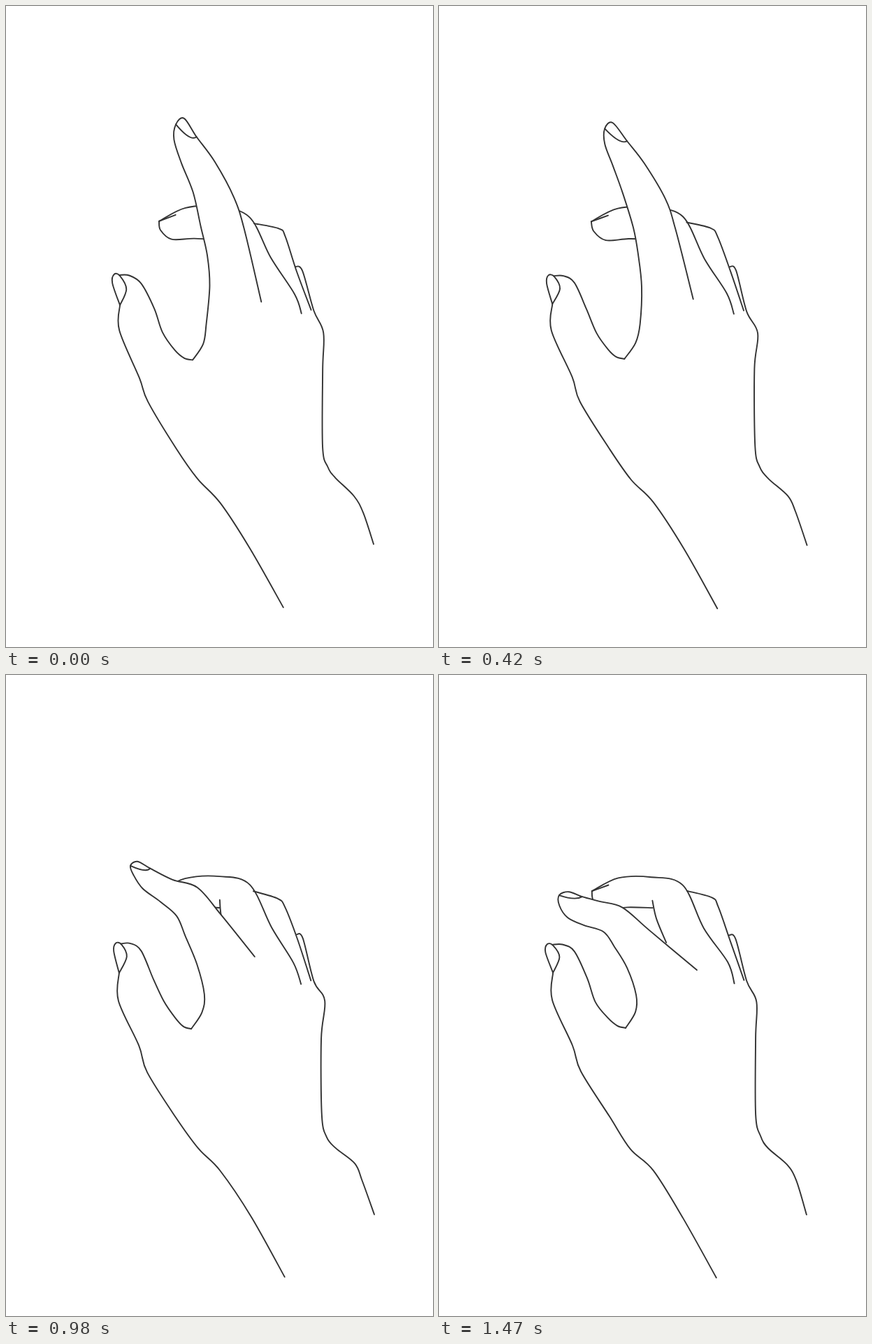
An HTML page with a canvas that plays this animation: 611 by 917 pixels, repeating every 1540 ms.

```html
<!DOCTYPE html>
<html lang="en">
<head>
<meta charset="utf-8">
<title>Tapping hand</title>
<style>
html, body { margin: 0; height: 100%; overflow: hidden; background: #fff; }
canvas { display: block; }
</style>
</head>
<body>
<canvas id="stage" width="611" height="917"></canvas>
<script>
const ctx = document.getElementById('stage').getContext('2d');
const STEP = 70, STEPS = 22, BOIL = 1.2;

const points = text => text.split(' ').map(pair => pair.split(',').map(Number));

// Parts that stay in place; the index finger covers some of them
const hand = {
  arm: '162,427 162,465 190,531 203,567 243,633 275,677 306,710 350,776 398,861',
  thumb: '163,385 177,385 193,396 212,434 225,467 241,491 254,503 266,506',
  thumbNail: '162,427 153,396 156,384 164,386 172,404 162,427',
  middle: '219,309 257,290 305,288 348,301 380,361 412,412 423,441',
  middleNail: '219,309 243,300',
  middlePad: '219,309 222,322 238,334 270,332 305,334',
  middleSide: '305,323 310,350 326,382',
  ring: '354,310 390,319 400,331 416,379 437,436',
  wrist: '415,372 424,378 441,437 455,467 452,520 452,630 460,660 472,676 498,700 510,724 527,771'
};

// Index finger: up its inner side, round the tip, down the outer side to the crease
const finger = {
  tapped: '266,506 280,483 282,458 270,418 250,390 235,368 208,357 185,346 172,330 171,316 185,311 205,317 232,323 263,332 300,366 368,423',
  half: '266,506 281,483 284,457 279,408 266,364 254,331 236,299 213,272 199,250 194,236 203,229 222,243 255,265 289,287 318,330 352,401',
  high: '266,506 281,482 288,452 298,399 296,355 291,312 280,258 268,208 261,172 267,146 281,137 300,168 318,207 345,275 350,320 374,437'
};

for (const group of [hand, finger])
  for (const name in group) group[name] = points(group[name]);

// [step, lift]: 0 is tapped down, 1 is raised fully
const taps = [[0, .87], [4, 0], [6, .84], [8, .87], [11, .5], [13, 0], [14, .27], [17, 1], [21, 0]];

function liftAt(step) {
  const next = taps.findIndex(([s]) => s >= step);
  if (next <= 0) return taps[0][1];
  const [s0, a] = taps[next - 1], [s1, b] = taps[next];
  return a + (b - a) * (step - s0) / (s1 - s0);
}

// A parabola through the three poses carries every point along an arc
function indexFinger(lift) {
  const low = (1 - lift) * (1 - 2 * lift);
  const mid = 4 * lift * (1 - lift);
  const top = lift * (2 * lift - 1);
  return finger.tapped.map((p, i) => p.map((v, axis) =>
    low * v + mid * finger.half[i][axis] + top * finger.high[i][axis]));
}

// Same small shift for the same place, so joined strokes stay joined
function boil([x, y], step) {
  const shift = k => BOIL * Math.sin(x * .03 + y * .05 + step * (2.4 + k) + k);
  return [x + shift(0), y + shift(1)];
}

function trace(p) {
  const at = i => p[Math.max(0, Math.min(p.length - 1, i))];
  ctx.beginPath();
  ctx.moveTo(...p[0]);
  for (let i = 1; i < p.length; i++) {
    const [a, b, c, d] = [at(i - 2), at(i - 1), at(i), at(i + 1)];
    ctx.bezierCurveTo(b[0] + (c[0] - a[0]) / 6, b[1] + (c[1] - a[1]) / 6,
      c[0] - (d[0] - b[0]) / 6, c[1] - (d[1] - b[1]) / 6, ...c);
  }
}

function drawNail(p) {
  const between = (a, b) => [(a[0] + b[0]) / 2, (a[1] + b[1]) / 2];
  const left = p[9], right = p[11];
  const [x, y] = between(left, right), base = between(p[7], p[12]);
  ctx.beginPath();
  ctx.moveTo(...left);
  ctx.quadraticCurveTo(x + (base[0] - x) * .35, y + (base[1] - y) * .35, ...right);
  ctx.stroke();
}

function draw(step) {
  ctx.fillStyle = '#fff';
  ctx.fillRect(0, 0, 611, 917);
  ctx.strokeStyle = '#333';
  ctx.lineWidth = 1.9;
  ctx.lineCap = ctx.lineJoin = 'round';
  for (const part of Object.values(hand)) {
    trace(part.map(p => boil(p, step)));
    ctx.stroke();
  }
  const index = indexFinger(liftAt(step)).map(p => boil(p, step));
  trace(index);
  ctx.fill();
  ctx.stroke();
  drawNail(index);
}

const begin = performance.now();
function tick() {
  draw(Math.floor((performance.now() - begin) / STEP) % STEPS);
  requestAnimationFrame(tick);
}
tick();
</script>
</body>
</html>
```
